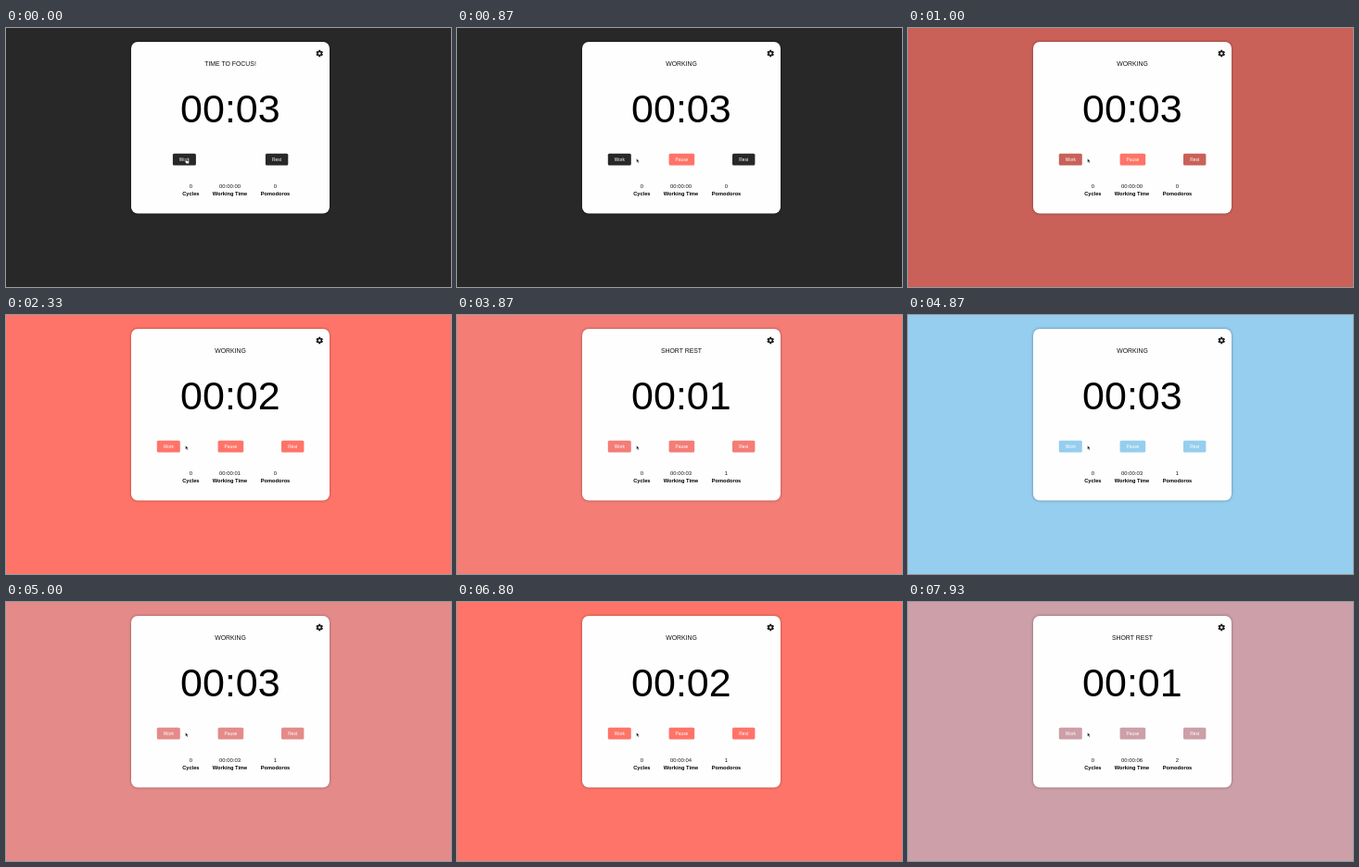
An HTML page that plays this animation: 480 by 280 pixels, repeating every 8 s.

```html
<!DOCTYPE html>
<html lang="en">
<head>
<meta charset="utf-8">
<title>Focus timer</title>
<style>
  html, body { margin: 0; width: 100%; height: 100%; overflow: hidden; }
  #stage { display: block; width: 480px; height: 280px; background: currentColor; }
  text { font-family: "Liberation Sans", Arial, sans-serif; text-anchor: middle; fill: #111; }
  .card { fill: #fefefe; filter: drop-shadow(0 .3px 1.6px rgba(0, 0, 0, .38)); }
  .title { font-size: 6.9px; }
  .clock { font-size: 43px; fill: #000; }
  .value { font-size: 5.9px; }
  .label { font-size: 5.7px; font-weight: bold; fill: #000; }
  .button rect { fill: currentColor; }
  .button text { font-size: 4.9px; fill: #fff; }
</style>
</head>
<body>
<svg id="stage" viewBox="0 0 480 280">
  <rect class="card" x="135" y="15" width="214" height="185.5" rx="7"/>
  <g transform="translate(338.2 27.5)">
    <path id="teeth" stroke="#1c1c1c" stroke-width="2.1"/>
    <circle r="2.75" fill="#1c1c1c"/>
    <circle r="1.3" fill="#fefefe"/>
  </g>
  <text class="title" id="title" x="242" y="40.8"></text>
  <text class="clock" id="clock" x="241.9" y="102"></text>

  <g class="button" id="work"><rect x="-12.5" y="135.8" width="25" height="12.6" rx="1.5"/><text y="143.7">Work</text></g>
  <g class="button" id="pause"><rect x="-13.8" y="135.8" width="27.6" height="12.6" rx="1.5"/><text y="143.7">Pause</text></g>
  <g class="button" id="rest"><rect x="-12.2" y="135.8" width="24.4" height="12.6" rx="1.5"/><text y="143.7">Rest</text></g>

  <text class="value" x="199.3" y="172.6">0</text>
  <text class="value" id="worked" x="241.5" y="172.6"></text>
  <text class="value" id="pomodoros" x="290.5" y="172.6"></text>
  <text class="label" x="199.3" y="181.3">Cycles</text>
  <text class="label" x="241.5" y="181.3">Working Time</text>
  <text class="label" x="290.5" y="181.3">Pomodoros</text>

  <path id="hand" transform="translate(192.6 140.8)" fill="#fff" stroke="#111" stroke-width=".5" stroke-linejoin="round"
    d="M1.1.5Q1.6 0 2 .6V2.4L4.4 2.9Q5.2 3.1 5.1 4L4.6 6H2L.2 3.8Q.2 3 1.1 3.4Z"/>
  <path id="arrow" transform="translate(193.7 141.2)" fill="#000" stroke="#fff" stroke-width=".35"
    d="M0 0V4.1L.95 3.3 1.6 4.8 2.3 4.5 1.7 3.1H2.9Z"/>
</svg>
<script>
const LOOP = 8000, FPS = 15, FADE = 300;
const DARK = [40, 40, 40], CORAL = [255, 116, 104], BLUE = [149, 206, 238];

// start, title, seconds on the clock, seconds worked, pomodoros, colour
const phases = [
  [0, "TIME TO FOCUS!", 3, 0, 0, DARK],
  [865, "WORKING", 3, 0, 0, CORAL],
  [3835, "SHORT REST", 1, 3, 1, BLUE],
  [4866, "WORKING", 3, 3, 1, CORAL],
  [7849, "SHORT REST", 1, 6, 2, BLUE]
];

const $ = id => document.getElementById(id);
const two = n => String(n).padStart(2, "0");
const rgb = c => `rgb(${c.map(Math.round)})`;
const mix = (a, b, k) => a.map((v, i) => v + (b[i] - v) * k);
const show = (id, on) => $(id).setAttribute("visibility", on ? "visible" : "hidden");
const place = (id, x) => $(id).setAttribute("transform", `translate(${x} 0)`);

// CSS "ease": cubic-bezier(.25, .1, .25, 1)
function ease(x) {
  if (x >= 1) return 1;
  const curve = (u, a, b) => 3 * a * u * (1 - u) ** 2 + 3 * b * u * u * (1 - u) + u ** 3;
  let lo = 0, hi = 1;
  for (let i = 0; i < 20; i++) {
    const mid = (lo + hi) / 2;
    if (curve(mid, .25, .25) < x) lo = mid; else hi = mid;
  }
  return curve(lo, .1, 1);
}

function draw(ms) {
  // the picture advances in steps of 1/15 s
  const t = Math.floor((ms + 4) * FPS / 1000) * 1000 / FPS;
  const n = phases.findLastIndex(p => t >= p[0]);
  const [start, title, left, worked, pomodoros, color] = phases[n];
  const before = n ? phases[n - 1][5] : color;
  const ticks = title === "WORKING" ? Math.min(2, Math.floor((t - start) / 1000)) : 0;

  $("stage").style.color = rgb(mix(before, color, ease((t - start) / FADE)));
  $("pause").style.color = n === 1 ? rgb(CORAL) : "";
  $("title").textContent = title;
  $("clock").textContent = "00:" + two(left - ticks);
  $("worked").textContent = "00:00:" + two(worked + ticks);
  $("pomodoros").textContent = pomodoros;

  place("work", n ? 175.3 : 192.4);
  place("rest", n ? 309.2 : 292.1);
  show("pause", n > 0);
  show("arrow", n > 0);
  show("hand", n === 0);
}

$("teeth").setAttribute("d", [0, 1, 2].map(i => {
  const a = Math.PI / 2 + i * Math.PI / 3, x = 3.8 * Math.cos(a), y = 3.8 * Math.sin(a);
  return `M${-x} ${-y}L${x} ${y}`;
}).join(""));
place("pause", 242.4);

const origin = performance.now();
function frame() {
  draw((performance.now() - origin) % LOOP);
  requestAnimationFrame(frame);
}
frame();
</script>
</body>
</html>
```
